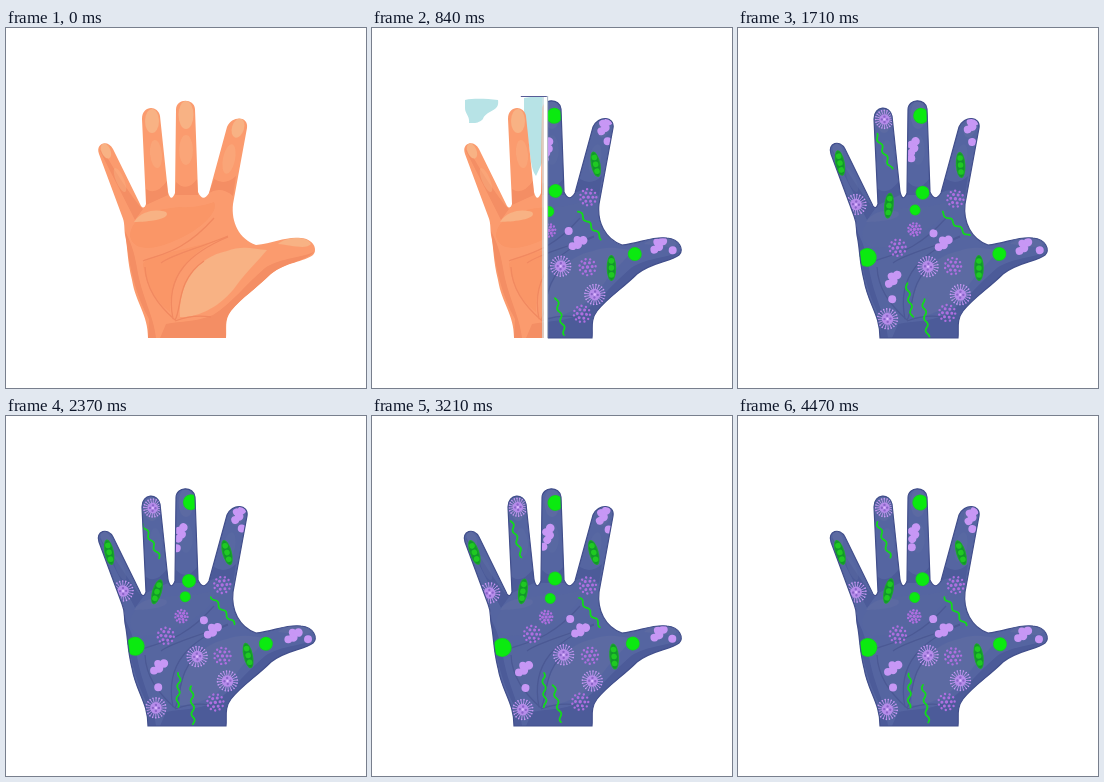
Write an HTML page with a canvas that moves like this. It is 360x360 px and loops after 4500 ms.

```html
<!DOCTYPE html>
<html lang="en">
<head>
<meta charset="utf-8">
<title>Hand scan</title>
<style>
  html, body { margin: 0; width: 100%; height: 100%; overflow: hidden; background: #fff; }
  canvas { display: block; width: 100vmin; height: 100vmin; }
</style>
</head>
<body>
<canvas id="stage" width="360" height="360"></canvas>
<script>
const ctx = document.getElementById('stage').getContext('2d');
const LOOP = 4500, STEP = 30, SCAN = 1500, TAU = Math.PI * 2;
const LILAC = '#c797f5', VIOLET = '#ae6fe0', LIME = '#0bea10';

const hand = new Path2D(`M142 310 C142 286 130 276 126 252 C121 232 122 220 119 207
  C118 199 119 195 116 188 L93 126 C89 115 102 111 107 121 L135 178 Q138 182 140 176
  L136 91 C136 77 152 77 154 88 L162 164 Q165 175 169 165 L170 82 C170 70 188 70 189 81
  L192 164 Q197 175 203 165 L221 99 C226 87 243 88 241 100 L227 176
  C225 194 233 211 250 217 C268 215 281 208 295 210 C308 211 312 222 307 227
  C298 234 280 234 265 246 C251 260 235 270 225 283 C218 292 221 301 220 310 Z`);
const shade = new Path2D(`M119 203 C123 240 130 268 143 291 L142 310 L150 310
  C148 288 136 270 131 240 C128 222 124 213 119 203 Z
  M309 223 C299 230 275 229 259 240 C240 256 225 276 207 287 C190 294 175 293 160 296
  L154 310 L220 310 C220 299 218 292 225 283 L265 246 C280 234 299 234 309 223 Z
  M93 121 L129 192 L137 181 L132 176 Q116 155 101 129 Z
  M170 154 L169 167 L192 167 L191 151 Q181 165 170 154 Z
  M203 165 L208 151 Q219 158 230 148 L227 168 Q215 158 203 165 Z
  M140 161 L140 177 L162 167 L161 153 Q150 168 140 161 Z`);
const pads = new Path2D(`M124 208 C125 188 149 181 174 179 C188 180 199 177 208 174
  C214 185 191 204 168 213 C149 222 127 224 124 208 Z
  M137 235 C151 223 190 222 219 208 C187 222 163 246 164 284 C149 273 138 253 137 235 Z`);
const thenar = new Path2D(`M174 289 C172 258 190 229 221 223 C236 217 248 221 261 222
  C251 234 242 242 230 258 C215 279 191 290 174 289 Z`);
const glints = new Path2D(`M128 194 C136 182 151 181 160 184 C166 191 142 194 128 194 Z
  M272 216 C281 208 302 208 305 216 C300 222 285 217 272 216 Z`);
const creases = new Path2D(`M137 233 C155 226 178 224 208 190 M155 235 C167 226 191 221 222 208
  M222 209 C186 224 158 246 167 291 M169 292 C176 281 170 252 198 233
  M139 239 C140 260 151 276 169 292 M169 293 Q187 286 205 289`);
const glass = new Path2D(`M152 70 L165 68 L237 68 L237 99 C222 111 217 127 207 134
  C199 140 194 132 190 138 L170 135 L164 148 C156 137 160 115 152 100 Z
  M93 72 C103 70 115 71 126 72 C128 84 114 82 111 91 C106 96 101 95 97 95
  C98 88 93 86 93 80 Z`);
const glassLow = new Path2D(`M237 146 C224 165 224 194 237 207 Z M237 270 C220 278 218 291 221 310 L237 310 Z`);
const chip = new Path2D('M172 135 L178 141 L173 147 Z');

const skin = { base: '#fb9b6e', shade: '#f48e64', pad: '#fa9667', light: '#f8b284', line: '#f18960' };
const night = { base: '#5565a1', shade: '#4c5b99', pad: '#5666a0', light: '#5c6aa2', line: '#4b5994' };

// kind, x, y, then size or tilt (and length)
const germs = [
  ['virus', 147, 92, 9], ['virus', 117.5, 176, 10], ['virus', 190.5, 239, 10],
  ['virus', 222, 266, 10], ['virus', 149.5, 292, 10],
  ['dots', 160, 219, 8.5], ['dots', 175.5, 201, 6.5], ['dots', 216, 239.5, 8.5],
  ['dots', 217, 169.5, 8.5], ['dots', 208.5, 285.5, 8.5],
  ['clump', 207, 215, 0], ['clump', 153.5, 251, -.1], ['clump', 286, 218, -.1],
  ['clump', 176, 118, -.6], ['clump', 232, 98, -.3],
  ['ball', 197, 204, 4], ['ball', 154, 271.5, 4], ['ball', 300.5, 223, 4],
  ['ball', 236, 113, 4], ['ball', 172, 131, 4],
  ['cell', 183, 87.5, 8], ['cell', 130.5, 230, 9.5], ['cell', 183, 164, 7],
  ['cell', 178, 182, 5.5], ['cell', 261.5, 227, 7],
  ['rod', 150, 176, .18], ['rod', 103, 136, -.22], ['rod', 222, 137, -.18], ['rod', 241, 239.5, -.1],
  ['worm', 146, 124, -.4, 38], ['worm', 217, 196, -.75, 36],
  ['worm', 172, 273, -.06, 34], ['worm', 187, 289, -.12, 38]
];

function disc(x, y, r, color) {
  ctx.fillStyle = color;
  ctx.beginPath();
  ctx.arc(x, y, r, 0, TAU);
  ctx.fill();
}

function oval(x, y, rx, ry, turn = 0) {
  ctx.beginPath();
  ctx.ellipse(x, y, rx, ry, turn, 0, TAU);
  ctx.fill();
}

function ring(n, r, size, color) {
  for (let i = 0; i < n; i++) disc(r * Math.cos(TAU * i / n), r * Math.sin(TAU * i / n), size, color);
}

const draw = {
  virus(r) {
    ctx.strokeStyle = LILAC;
    ctx.lineWidth = .8;
    ctx.beginPath();
    for (let i = 0; i < 20; i++) {
      const c = Math.cos(TAU * i / 20), s = Math.sin(TAU * i / 20);
      ctx.moveTo(c * r * .55, s * r * .55);
      ctx.lineTo(c * r, s * r);
    }
    ctx.stroke();
    ring(20, r, .8, LILAC);
    disc(0, 0, r * .58, '#b68cea');
    ring(4, r * .3, 1.2, '#8a63c8');
    disc(0, 0, 1.2, '#dcb8ff');
  },
  dots(r) {
    ring(11, r * .95, 1.2, VIOLET);
    ring(6, r * .55, 1.5, VIOLET);
    disc(0, 0, 1.7, VIOLET);
  },
  clump(turn) {
    ctx.rotate(turn);
    disc(5, -3, 4.3, LILAC);
    disc(-1, -3, 3.6, LILAC);
    disc(0, 2, 4.3, LILAC);
    disc(-5, 4, 3.9, LILAC);
  },
  ball(r) { disc(0, 0, r, LILAC); },
  cell(r) {
    disc(0, 0, r, '#17cb24');
    disc(0, 0, r - .8, LIME);
  },
  rod(turn) {
    ctx.rotate(turn);
    ctx.fillStyle = '#1ba92c';
    oval(0, 0, 4.8, 13);
    ctx.fillStyle = '#12972a';
    oval(0, 0, 3.8, 12);
    for (const y of [-7, 0, 7]) disc(0, y, 2.8, '#1fc922');
  },
  worm(turn, len, t) {
    ctx.rotate(turn);
    ctx.strokeStyle = '#12d91c';
    ctx.lineWidth = 1.8;
    ctx.lineCap = 'round';
    ctx.beginPath();
    for (let y = -len / 2; y <= len / 2; y++) ctx.lineTo(1.5 * Math.sin(y * .5 + t * TAU * 2 / LOOP), y);
    ctx.stroke();
  }
};

function paintHand(c) {
  ctx.save();
  ctx.fillStyle = c.base;
  ctx.fill(hand);
  ctx.clip(hand);
  ctx.fillStyle = c.shade;
  ctx.fill(shade);
  ctx.fillStyle = c.pad;
  ctx.fill(pads);
  ctx.fillStyle = c.light;
  ctx.fill(thenar);
  ctx.fill(glints);
  oval(100, 123, 4.5, 8, -.4);
  oval(146, 93, 7, 12);
  oval(180, 87, 7.5, 14);
  oval(232, 100, 6, 10, .3);
  ctx.globalAlpha = .45;
  oval(150, 126, 6, 14, -.1);
  oval(180, 122, 7, 15);
  oval(223, 131, 6, 15, .2);
  oval(114, 152, 4, 13, -.4);
  ctx.globalAlpha = 1;
  ctx.strokeStyle = c.line;
  ctx.lineWidth = 1.3;
  ctx.stroke(creases);
  ctx.restore();
}

function paintGerms(t) {
  ctx.save();
  ctx.clip(hand);
  germs.forEach(([kind, x, y, a, b], i) => {
    const u = TAU * t / LOOP;
    const dx = 1.2 * Math.sin(5 * u + i * 2.4) + .7 * Math.sin(8 * u + i * 4.1);
    const dy = Math.sin(4 * u + i * 3.7) + .6 * Math.sin(7 * u + i * 1.9);
    ctx.save();
    ctx.translate(x + dx, y + dy);
    ctx.rotate(.12 * Math.sin(4 * u + i * 5.3));
    draw[kind](a, b, t);
    ctx.restore();
  });
  ctx.restore();
  ctx.strokeStyle = '#414e8b';
  ctx.lineWidth = 1.2;
  ctx.stroke(hand);
}

function within(x, w, paint) {
  ctx.save();
  ctx.beginPath();
  ctx.rect(x, 0, w, 360);
  ctx.clip();
  paint();
  ctx.restore();
}

function render(t) {
  ctx.fillStyle = '#fff';
  ctx.fillRect(0, 0, 360, 360);
  if (t < STEP) return paintHand(skin);

  const p = (1 - Math.cos(Math.PI * Math.min(t / SCAN, 1))) / 2;
  const edge = 305 - 226 * p;
  const glassy = t < 1080;

  within(edge + 4, 360, () => {
    paintHand(night);
    paintGerms(t);
  });
  if (edge < 92) return;

  within(0, edge + 1, () => {
    if (glassy) {
      ctx.fillStyle = '#b7e3e6';
      ctx.fill(glass);
      ctx.fillStyle = '#a1d5e8';
      ctx.fill(glassLow);
    }
    paintHand(skin);
    ctx.fillStyle = '#fff';
    if (glassy) ctx.fill(chip);
    // the clean side pales as the scan runs out
    ctx.globalAlpha = Math.max(0, (124 - edge) / 64);
    ctx.fillRect(0, 0, 360, 360);
  });
  ctx.fillStyle = '#fff';
  ctx.fillRect(edge + 1, 68, 4, 243);
  ctx.fillStyle = '#d3e2e5';
  ctx.fillRect(edge - .5, 69, 1.3, 241);
  if (glassy) {
    ctx.fillStyle = '#aab4c4';
    ctx.fillRect(edge + 4.3, 68, 1, 242);
    ctx.fillStyle = '#565b96';
    ctx.fillRect(edge - 22, 68, 26, 1);
  }
}

function tick() {
  const t = performance.now() % LOOP;
  render(Math.floor(t / STEP) * STEP);
  requestAnimationFrame(tick);
}
tick();
</script>
</body>
</html>
```
